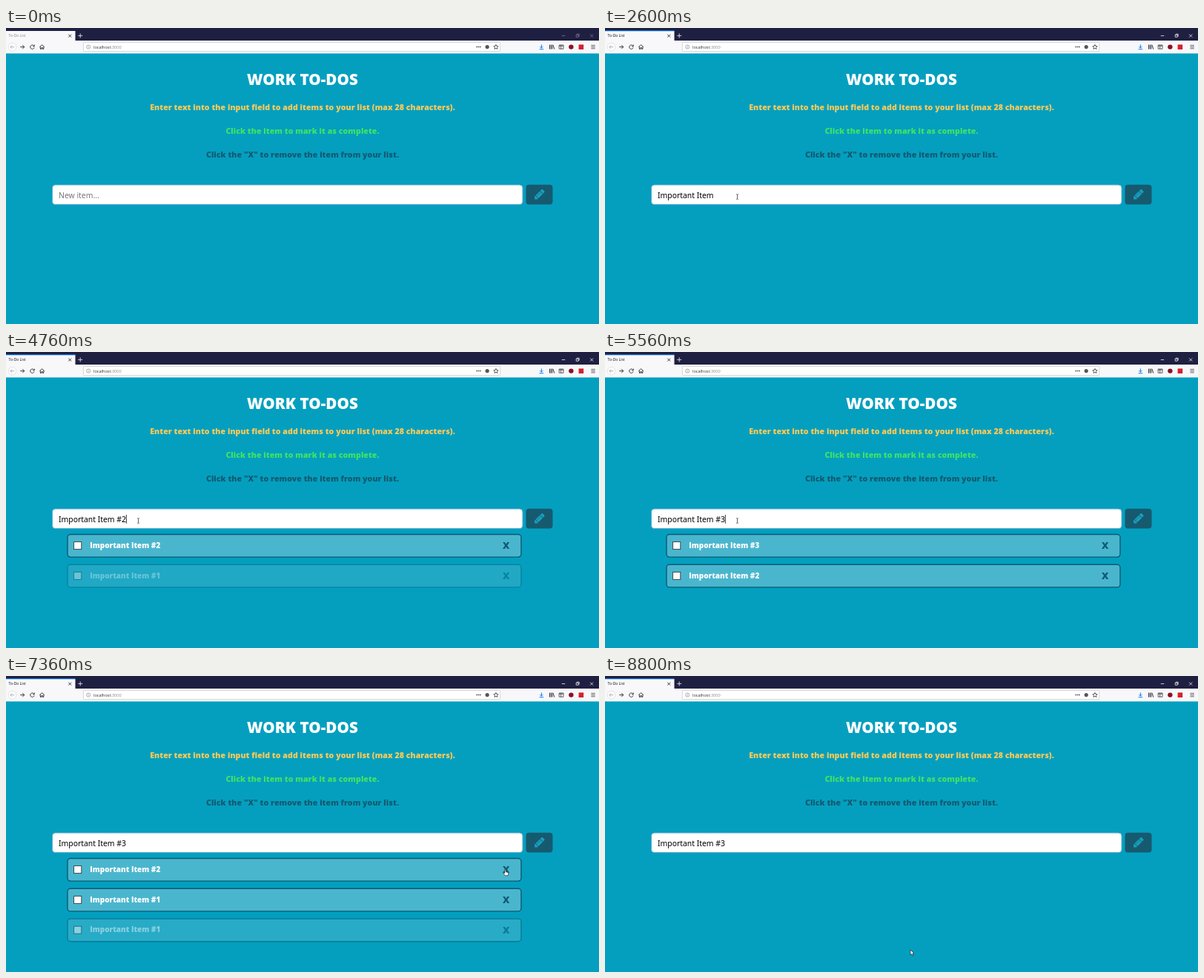
Write an HTML page that moves like this. It is 800 by 400 pixels and loops after 8840 ms.

```html
<!DOCTYPE html>
<html lang="en">
<head>
<meta charset="utf-8">
<title>To-Do List</title>
<style>
  html, body { margin: 0; width: 100%; height: 100%; overflow: hidden; background: #049fbf; }
  svg { display: block; width: 800px; height: 400px; }
  text { white-space: pre; }
  .bold { font-family: "Open Sans", sans-serif; font-weight: 800; }
  .mid { text-anchor: middle; }
  .ui { font-family: "Open Sans", sans-serif; }
  .field { font: 10.4px "Noto Sans", sans-serif; }
  .line { fill: none; stroke: #38383d; stroke-width: 1; }
</style>
</head>
<body>
<svg viewBox="0 0 800 400">
  <rect width="800" height="400" fill="#049fbf"/>

  <!-- browser window -->
  <rect width="800" height="18" fill="#1f2041"/>
  <rect y="4" width="93.5" height="14" fill="#f8f8fb"/>
  <rect id="tabLine" y="3.3" width="93.5" height="1" fill="#0a84ff"/>
  <text id="tabTitle" class="ui" x="3.6" y="12.4" font-size="5">To-Do List</text>
  <path class="line" d="M84.3 8.7l3.8 3.8m0-3.8l-3.8 3.8" stroke-width=".9"/>
  <path d="M97.2 10.4h6m-3-3v6" stroke="#dcdce6" stroke-width=".9"/>
  <g id="controls" fill="none" stroke-width=".8">
    <path d="M749.8 10.5h4.4M769.2 9.2h3v3h-3zM770.2 9.2v-1h3v3h-1M788.2 8.5l4 4m0-4l-4 4"/>
  </g>
  <rect y="17" width="800" height="17.4" fill="#f8f8fb"/>
  <circle cx="8.5" cy="25.6" r="5.4" fill="#fdfdfe" stroke="#d3d3d8" stroke-width=".6"/>
  <path class="line" d="M11.3 25.6h-5.4m2.4-2.4l-2.4 2.4 2.4 2.4" style="stroke:#b5b5ba"/>
  <path class="line" d="M19.2 25.6h5.6m-2.5-2.5l2.5 2.5-2.5 2.5"/>
  <path class="line" d="M37.6 24a2.7 2.7 0 1 0 .5 2.4M38.3 22.6v2.2h-2.2"/>
  <path class="line" d="M45.3 25.8l3.3-3.1 3.3 3.1M46.4 25.4v3h1.5v-1.8h1.4v1.8h1.5v-3"/>
  <rect x="104.4" y="19.4" width="562.4" height="12.2" rx="1" fill="#fff" stroke="#c9c9ce" stroke-width=".7"/>
  <circle class="line" cx="111.2" cy="25.6" r="2.6" style="stroke:#77777d;stroke-width:.6"/>
  <path class="line" d="M111.2 25.2v1.8m0-2.9v.6" style="stroke:#77777d;stroke-width:.6"/>
  <text class="ui" x="118" y="27.7" font-size="5.6" fill="#2a2a2e">localhost<tspan fill="#8a8a90">:3000</tspan></text>
  <path d="M634.6 25.6h6" stroke="#38383d" stroke-width="1.5" stroke-dasharray="1.4 .9"/>
  <circle cx="649.2" cy="25.6" r="2.6" fill="#55555a"/>
  <path class="line" d="M661 22.4l.95 2.1 2.25.25-1.7 1.55.5 2.2-2-1.15-2 1.15.5-2.2-1.7-1.55 2.25-.25z" stroke-linejoin="round" style="stroke-width:.8"/>
  <path class="line" d="M722.4 22.4v4.6m-2.1-2l2.1 2.1 2.1-2.1M719.6 28.7h5.6" style="stroke:#0a7cf0"/>
  <path class="line" d="M733.5 22.6v6m1.7-6v6m1.7-6v6m1-5.8l1.9 5.8"/>
  <path class="line" d="M746.2 23h5.8v5.2h-5.8zM748.7 23v5.2M746.2 24.2h5.8" style="stroke-width:.8"/>
  <circle cx="762.4" cy="25.6" r="3.2" fill="#8c1024"/>
  <rect x="772.6" y="22.4" width="6.6" height="6.6" fill="#d5212c"/>
  <path class="line" d="M789.4 23.4h5.4m-5.4 2.2h5.4m-5.4 2.2h5.4" style="stroke-width:.8"/>

  <!-- page -->
  <g class="bold mid">
    <text x="400" y="77" font-size="20.7" fill="#fff">WORK TO-DOS</text>
    <g font-size="10.7">
      <text x="400" y="111.3" fill="#f8ca59">Enter text into the input field to add items to your list (max 28 characters).</text>
      <text x="400" y="143.2" fill="#3fe266">Click the item to mark it as complete.</text>
      <text x="400" y="174.8" fill="#125a70">Click the "X" to remove the item from your list.</text>
    </g>
  </g>
  <rect x="62.5" y="212" width="634.5" height="26.6" rx="4" fill="#fff" stroke="#58a9cd" stroke-width="1"/>
  <text id="entry" class="field" x="71" y="229.7"></text>
  <rect id="caret" y="220" width=".8" height="11.8"/>
  <rect x="701.5" y="211.8" width="36" height="26.6" rx="4" fill="#165a70"/>
  <g transform="translate(719.3 225.3) rotate(-45)" fill="#18a0bf">
    <path d="M-8.6 0l2.5-2.7h1.4v5.4h-1.4zM-4.1-2.7h8.2v5.4h-8.2zM4.8-2.7h2.1q1.4 0 1.4 1.4v2.6q0 1.4-1.4 1.4h-2.1z"/>
    <path d="M-3.4-.8h6.8" stroke="#165a70" stroke-width=".6"/>
  </g>
  <g id="list"></g>

  <!-- pointers -->
  <g id="pointer">
    <path id="beam" d="M-1.3-3.4q1.3 0 1.3.8v5.2q0 .8-1.3.8M1.3-3.4q-1.3 0-1.3.8m0 5.2q0 .8 1.3.8" fill="none" stroke="#222" stroke-width=".7"/>
    <path id="arrow" d="M0 0v7l1.6-1.5 1.1 2.5 1.2-.5-1.1-2.5h2.2z" fill="#fff" stroke="#111" stroke-width=".6"/>
    <path id="hand" d="M-.7.6q.7-1.1 1.4 0v2.6l3 .7q.7.3.6 1.1l-.6 3.2h-3.9l-2.3-3q0-1 1-.7l.8.7z" fill="#fff" stroke="#111" stroke-width=".6"/>
  </g>
</svg>
<script>
const LOOP = 8840, STEP = 40, FADE = 500;
const ACTIVATED = 760, BLINK = 265, ROW_PITCH = 40.8;
const added = [3160, 4560, 5560];
const removed = [7120, 7860, 8160];
const $ = id => document.getElementById(id);

const phrase = "Important Item #1", base = phrase.slice(0, -1);
const keyTimes = [1120, 1440, 1640, 1840,
  ...Array.from({ length: 10 }, (_, i) => 1920 + i * STEP), 2840, 2920, 3000];
const edits = keyTimes.map((time, i) => [time, phrase.slice(0, i + 1)]);
edits.push([3880, base], [4120, base + "2"], [5160, base], [5440, base + "3"]);

// time, x, y
const path = [
  [320, 1, 190], [760, 178.5, 228], [6160, 178.5, 228], [6440, 698, 300],
  [6640, 700, 346], [6960, 673.5, 261.5], [8240, 673.5, 261.5], [8800, 412, 370]
];

$("list").innerHTML = added.map((_, i) => `
  <g class="bold" transform="translate(0 ${i * ROW_PITCH})">
    <rect x="83" y="246.5" width="612" height="30.6" rx="4" fill="#4ab6ce" stroke="#0b5a70" stroke-width="1.4"/>
    <rect x="91.6" y="256.6" width="10.2" height="10" fill="#fff" stroke="#333c40" stroke-width=".9"/>
    <text x="113.3" y="264.9" font-size="10" fill="#fff"></text>
    <text class="mid" x="674.6" y="266.4" font-size="13" fill="#0f5b72">X</text>
  </g>`).join("");
const rows = [...$("list").children];

const clamp = v => Math.max(0, Math.min(1, v));
const show = (el, on) => el.setAttribute("visibility", on ? "visible" : "hidden");
const countPast = (times, t) => times.filter(time => t >= time).length;

function drawWindow(t) {
  const active = t >= ACTIVATED;
  $("tabTitle").setAttribute("fill", active ? "#0c0c0d" : "#85858c");
  $("controls").setAttribute("stroke", active ? "#f0f0f5" : "#77788e");
  show($("tabLine"), active);
}

function drawEntry(t) {
  const last = edits.filter(([time]) => t >= time).pop();
  const entry = $("entry");
  entry.textContent = last ? last[1] : "New item...";
  entry.setAttribute("fill", last ? "#000" : "#757575");
  const width = last ? entry.getComputedTextLength() : 0;
  const since = t - (last ? last[0] : ACTIVATED);
  $("caret").setAttribute("x", 71 + width);
  show($("caret"), t >= ACTIVATED && t < removed[0] && since % (2 * BLINK) < BLINK);
}

function rowOpacity(i, t) {
  const leave = removed[removed.length - 1 - i];
  return clamp((t - added[i]) / FADE) - clamp((t - leave) / FADE);
}

function drawList(t) {
  const count = countPast(added, t) - countPast(removed, t);
  rows.forEach((row, i) => {
    row.setAttribute("opacity", rowOpacity(i, t));
    row.querySelector("text").textContent = base + Math.max(1, count - i);
  });
}

function drawPointer(t) {
  show($("pointer"), t >= path[0][0]);
  const next = Math.max(1, path.findIndex(p => p[0] >= t));
  const [t0, x0, y0] = path[next - 1], [t1, x1, y1] = path[next];
  const k = clamp((t - t0) / (t1 - t0)), ease = k * k * (3 - 2 * k);
  const x = x0 + (x1 - x0) * ease, y = y0 + (y1 - y0) * ease;
  $("pointer").setAttribute("transform", `translate(${x} ${y})`);
  const inField = x > 62 && x < 697 && y > 212 && y < 239;
  const onRow = x > 83 && x < 695 && rows.some((_, i) => {
    const dy = y - 246.5 - i * ROW_PITCH;
    return dy > 0 && dy < 30.6 && rowOpacity(i, t) > 0;
  });
  const kind = inField ? "beam" : onRow ? "hand" : "arrow";
  for (const id of ["beam", "hand", "arrow"]) {
    $(id).setAttribute("display", id === kind ? "inline" : "none");
  }
}

function render(t) {
  drawWindow(t);
  drawEntry(t);
  drawList(t);
  drawPointer(t);
}

const start = performance.now();
function tick() {
  const elapsed = (performance.now() - start) % LOOP;
  render(Math.floor(elapsed / STEP) * STEP);
  requestAnimationFrame(tick);
}
render(0);
requestAnimationFrame(tick);
</script>
</body>
</html>
```
